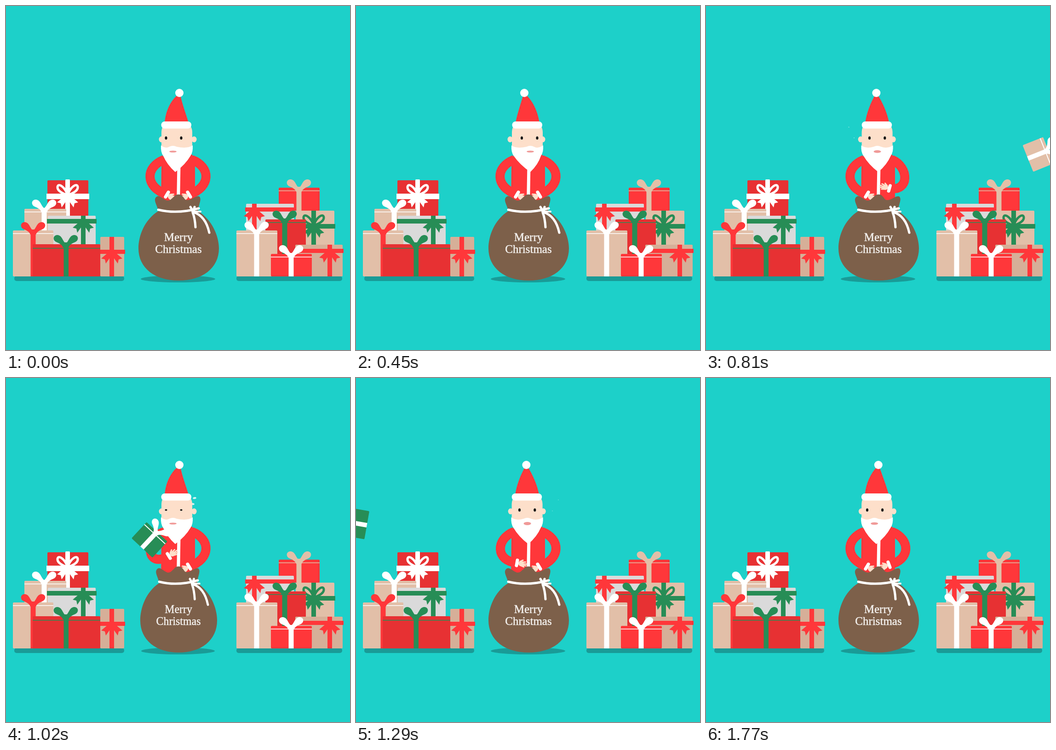
An HTML page with a canvas that plays this animation: 748 by 748 pixels, repeating every 1.8 s.

```html
<!DOCTYPE html>
<html lang="en">
<head>
<meta charset="utf-8">
<title>Merry Christmas</title>
<style>
  html, body { margin: 0; height: 100%; overflow: hidden; background: #1dd0c9; }
  canvas { display: block; width: 748px; height: 748px; }
</style>
</head>
<body>
<canvas id="stage" width="748" height="748"></canvas>
<script>
const ctx = document.getElementById('stage').getContext('2d');
const SIZE = 748, LOOP = 900, HALF = 450, STEP = 30;
const BG = '#1dd0c9', SHADE = '#199b97', RED = '#ff373a', CRIMSON = '#e73133',
  TAN = '#e2bfa8', CLAY = '#d6af98', GREEN = '#278d56', GREY = '#dadada',
  WHITE = '#fff', SKIN = '#fddfca', BROWN = '#7d604a';

// ---- helpers ----
const mix = (a, b, k) => a + (b - a) * k;

// Rows are [time, ...values]; values are interpolated linearly.
function at(t, rows) {
  let i = 0;
  while (i < rows.length - 2 && t >= rows[i + 1][0]) i++;
  const [a, b] = [rows[i], rows[i + 1]];
  const k = Math.min(1, Math.max(0, (t - a[0]) / (b[0] - a[0])));
  return a.slice(1).map((v, n) => mix(v, b[n + 1], k));
}
function group(draw) { ctx.save(); draw(); ctx.restore(); }
function mirrored(draw) {
  group(() => { ctx.translate(SIZE, 0); ctx.scale(-1, 1); draw(); });
}
function fill(d, color) {
  ctx.fillStyle = color;
  ctx.fill(new Path2D(d));
}
function line(d, color, width, cap = 'round') {
  ctx.strokeStyle = color;
  ctx.lineWidth = width;
  ctx.lineCap = cap;
  ctx.lineJoin = 'round';
  ctx.stroke(new Path2D(d));
}
function box(x, y, w, h, color, r = 0) {
  ctx.fillStyle = color;
  ctx.beginPath();
  ctx.roundRect(x, y, w, h, r);
  ctx.fill();
}
function oval(x, y, rx, ry, color, turn = 0) {
  ctx.fillStyle = color;
  ctx.beginPath();
  ctx.ellipse(x, y, rx, ry, turn, 0, 7);
  ctx.fill();
}
function bothSides(x, y, scale, draw) {
  for (const s of [1, -1]) group(() => {
    ctx.translate(x, y);
    ctx.scale(s * scale, scale);
    draw();
  });
}

// ---- presents ----
const bow = (x, y, color, scale = 1) => bothSides(x, y, scale, () =>
  fill('M-1 0C7 -4 7 -18 18 -19C28 -19 29 -8 21 -4C14 -1 8 2 6 8L-1 8Z', color));
const tails = (x, y, color, scale = 1) => bothSides(x, y, scale, () =>
  fill('M-1 -3L3 -3L23 14L15 16L13 25L-1 5Z', color));
const loops = (x, y, color) => bothSides(x, y, 1, () =>
  line('M0 0C6 -18 20 -27 22 -18C23 -9 10 -3 0 0', color, 5));

// Box with an eared bow, an upright ribbon and a thin lid line.
function eared(x, y, w, h, color, ribbon, mid, bowY = y - 1, lineColor = ribbon) {
  box(x, y, w, h, color, 2);
  box(x, y + 6, w, 1.6, lineColor);
  box(mid - 5.5, y - 2, 11, h + 2, ribbon);
  bow(mid, bowY, ribbon);
}
// Box with crossed ribbons and hanging tails.
function crossed(x, y, w, h, color, ribbon, mid, bandY, band = 10, scale = 1) {
  box(x, y, w, h, color, 2);
  box(mid - 5, y, 10, h, ribbon);
  box(x - 2, bandY, w + 4, band, ribbon);
  tails(mid, bandY + 5, ribbon, scale);
}
function leftPile() {
  box(18, 587, 239, 11, SHADE, 5);
  crossed(90, 379, 89, 78, CRIMSON, WHITE, 134, 408, 12);
  box(129.5, 377, 9, 4, WHITE);
  loops(134, 411, WHITE);
  eared(40, 441, 91, 50, TAN, WHITE, 83, 440);
  crossed(91, 456, 104, 64, GREY, GREEN, 168, 463, 10);
  eared(15, 488, 88, 100, TAN, RED, 59, 489, WHITE);
  crossed(205, 502, 52, 86, CLAY, RED, 230, 530, 9);
  box(54, 518, 12, 70, RED);
  box(58, 518, 147, 70, CRIMSON, 2);
  box(58, 526, 147, 1.4, GREEN);
  box(125.5, 514, 10.5, 74, GREEN);
  bow(130, 517, GREEN);
}
function rightPile() {
  box(501, 587, 230, 11, SHADE, 5);
  eared(593, 395, 89, 50, RED, TAN, 637, 396);
  crossed(522, 430, 104, 60, GREY, RED, 540, 438, 9);
  crossed(630, 445, 84, 75, TAN, GREEN, 669, 474, 10);
  loops(669, 477, GREEN);
  eared(564, 464, 88, 76, CRIMSON, GREEN, 606, 464);
  crossed(629, 519, 103, 69, CLAY, RED, 704, 528, 9);
  eared(501, 488, 89, 100, TAN, WHITE, 545, 488);
  eared(576, 539, 89, 49, RED, WHITE, 620, 539);
}
// One throw, always drawn towards the left; midX is the place just before release.
function flying(t, color, midX, outX) {
  if (t < 15 || t >= HALF) return;
  const [x, y, turn] = at(t, [
    [0, 362, 470, 90], [60, 342, 396, 68], [90, 322, 364, 56], [120, 312, 352, 43],
    [180, midX, midX < 280 ? 342 : 349, 12], [270, outX, 343, -33],
    [390, 0, 316, -80], [450, -62, 302, -103]]);
  group(() => {
    ctx.translate(x, y);
    ctx.rotate(turn * Math.PI / 180);
    box(-31, -24, 62, 48, color, 2);
    box(-31, -18, 62, 2, WHITE);
    box(-5, -25, 10, 49, WHITE);
    bow(0, -26, WHITE, .95);
  });
}

// ---- figure ----
function arm(t) {
  const [ax, bx, by, x, y, turn] = at(t, [
    [0, 302, 302, 394, 350, 410, 121],
    [60, 302, 302, 404, 352, 402, 95],
    [120, 301, 304, 416, 354, 387, 58],
    [180, 304, 306, 424, 351, 376, 8],
    [270, 314, 312, 424, 347, 380, -3],
    [390, 303, 303, 398, 350, 402, 100],
    [450, 302, 302, 394, 350, 410, 121]]);
  line(`M344 334C${ax} 350 ${bx} ${by} ${x} ${y}`, RED, 20, 'butt');
  group(() => {
    ctx.translate(x, y);
    ctx.rotate(turn * Math.PI / 180);
    oval(0, -9, 5.5, 6, SKIN);
    line('M-3 -8L-5 -18M0 -9L-1 -21M2 -9L3 -20M4 -8L6 -16M-4 -6L-8 -12', SKIN, 3);
    line('M-6 0L6 0', WHITE, 7);
  });
}
function torso() {
  fill('M350 320L398 320Q412 324 411 345L411 430L337 430L338 345Q338 324 350 320Z', RED);
  line('M376 345L374.5 430', WHITE, 7, 'butt');
}
function sweat(t) {
  if (t < 60 || t > 440) return;
  const [x1, y1, x2, y2, r] = at(t, [
    [60, 396, 270, 394, 280, 3.5], [120, 410, 261, 406, 274, 3.8],
    [180, 421, 256, 416, 272, 3.3], [270, 430, 258, 423, 280, 2.2],
    [390, 440, 265, 427, 289, .7], [440, 446, 269, 430, 294, 0]]);
  oval(x1, y1, r, r * .55, '#d5f5f3', -.15);
  oval(x2, y2, r, r * .55, '#d5f5f3', .1);
}
function head(k, t) {
  const m = (a, b) => mix(a, b, k);
  const [lid] = at(t, [[0, 1], [60, .85], [120, .5], [180, .2], [270, .27], [360, 1]]);
  const [lip] = at(t, [[300, 2], [390, 3.4], [450, 2]]);
  const left = m(337, 338), right = m(406, 407), tip = m(368, 379);

  oval(m(338, 335), 290, 5.5, 6.5, SKIN);
  oval(m(409, 406), 290, 5.5, 6.5, SKIN);
  box(left + 1, 250, right - left - 2, 72, SKIN, [24, 24, 8, 8]);
  for (const x of [m(348, 360.5), m(381, 394)]) oval(x, 287, 2.6, 3.6 * lid, '#111');

  const lipX = m(363, 379);
  fill(`M${left} 303Q${left + 10} 311 ${lipX - 8} 306Q${lipX} 302 ${lipX + 8} 306
    Q${right - 12} 311 ${right} 303Q${right + 1} 318 ${right - 5} 326
    Q${m(390, 396)} 345 ${tip} 361Q${m(350, 356)} 345 ${left + 5} 326
    Q${left - 1} 318 ${left} 303Z`, WHITE);
  oval(lipX, 316.5, 8, lip, '#f09a98');

  const top = m(377, 366), a = m(345, 347), b = m(397, 399);
  fill(`M${a} 254C${m(347, 350)} ${m(228, 236)} ${m(358, 358)} ${m(205, 214)} ${top - 2} 192
    L${top + 2} 192C${m(383, 384)} ${m(214, 205)} ${m(392, 395)} ${m(236, 228)} ${b} 254Z`, RED);
  oval(top, 189, 9, 9, WHITE);
  box(m(337.5, 339.5), 251, 65.5, 15.5, WHITE, 7.5);
}

// ---- sack ----
function inSack(sx, sy, draw) {
  group(() => {
    ctx.translate(375.5, 597);
    ctx.scale(sx, sy);
    ctx.translate(-375.5, -597);
    draw();
  });
}
function sack() {
  fill(`M331 446C329 432 319 422 327 415C334 410 340 420 350 423C358 424 360 418 365 415
    C368 409 380 408 383 413C388 417 388 422 394 422C404 422 412 412 420 414
    C427 420 418 432 418 446C448 465 463 500 463 527C463 570 427 597 375.5 597
    C324 597 288 570 288 527C288 500 301 465 331 446Z`, BROWN);
  line('M331 443Q372 453 419 440', WHITE, 5);
  line('M401 437Q406 444 406 449Q411 462 412 481', WHITE, 5);
  line('M410 437L407 448Q434 456 442 493', WHITE, 5);
  line('M407 447L423 447', WHITE, 4);
  ctx.font = '25px "Liberation Serif", "Times New Roman", serif';
  ctx.textAlign = 'center';
  ctx.fillStyle = ctx.strokeStyle = '#f4f1ee';
  ctx.lineWidth = .5;
  for (const [word, y] of [['Merry', 511], ['Christmas', 537]]) {
    ctx.fillText(word, 375, y);
    ctx.strokeText(word, 375, y);
  }
}

// ---- scene ----
function scene(t) {
  const half = t % HALF, first = t < HALF;
  const leftT = first ? t : HALF, rightT = first ? HALF : half;
  const turned = Math.max(0, (half - 300) / 150);
  const [sx, sy] = at(half, [[0, 1, 1], [120, .955, 1], [180, 1, .922], [270, 1, .99], [330, 1, 1]]);

  box(0, 0, SIZE, SIZE, BG);
  leftPile();
  rightPile();
  oval(374, 593.5, 81 + (1 - sy) * 45 - (1 - sx) * 20, 7.5, SHADE);
  inSack(sx, sy, () => box(343, 416, 64, 25, '#000'));
  mirrored(() => flying(rightT, TAN, 301, 103));
  torso();
  arm(leftT);
  mirrored(() => arm(rightT));
  flying(leftT, GREEN, 262, 112);
  if (first) sweat(half); else mirrored(() => sweat(half));
  head(first ? turned : 1 - turned, half);
  inSack(sx, sy, sack);
}

const start = performance.now();
function tick() {
  const t = (performance.now() - start) % LOOP;
  scene(Math.floor(t / STEP) * STEP);
  requestAnimationFrame(tick);
}
tick();
</script>
</body>
</html>
```
